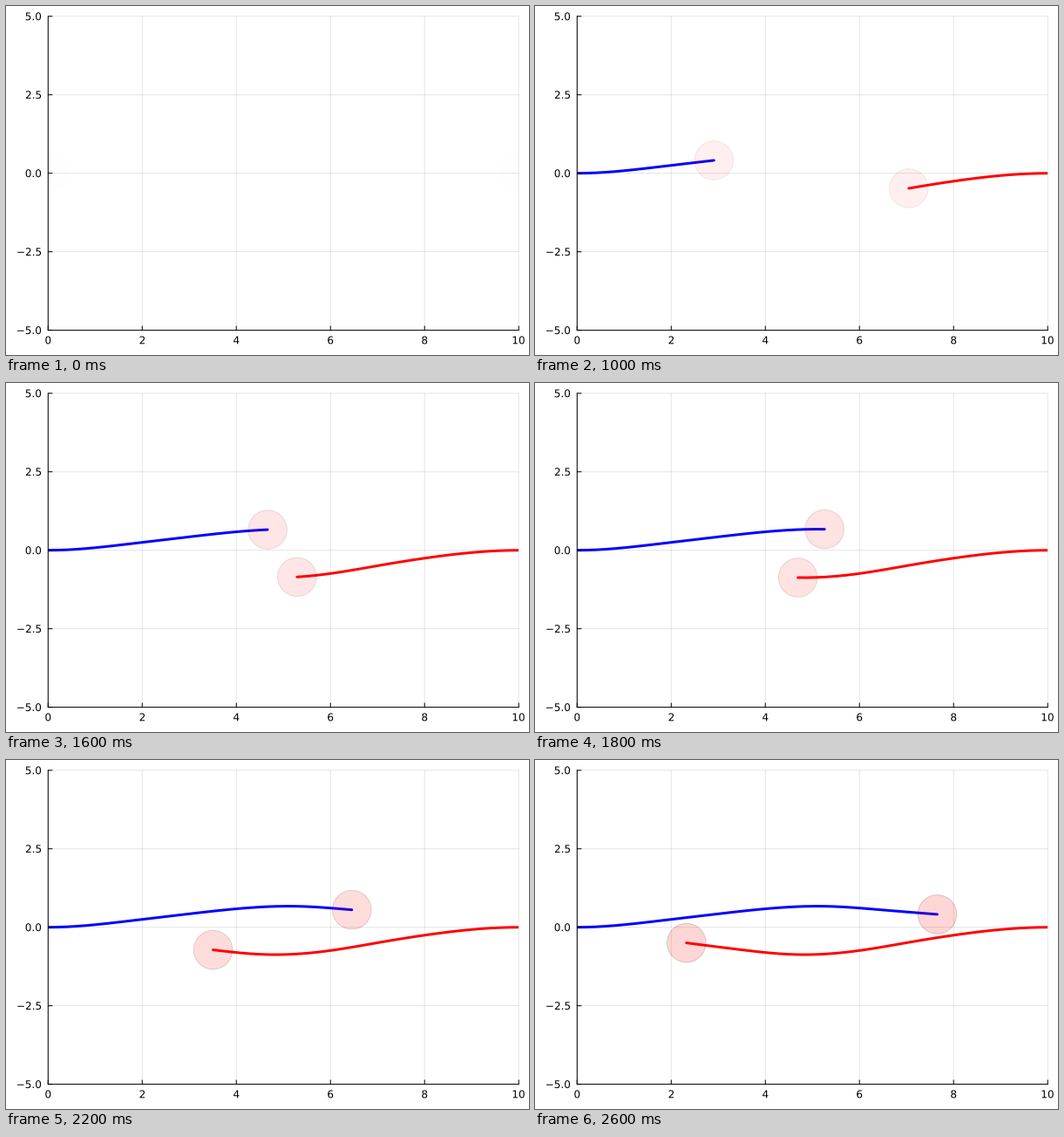
Write a matplotlib script that moves like this. It is 600 px wide and 400 px high and loops after 2.67 s.

```python
import numpy as np
import matplotlib.pyplot as plt
from matplotlib.animation import FuncAnimation
from matplotlib.patches import Circle, PathPatch, Rectangle
from matplotlib.textpath import TextPath
from matplotlib.transforms import Affine2D

DPI = 100
PX = 72 / DPI                  # one pixel in points
LEFT, RIGHT, TOP, BOTTOM = 48.3, 588.19, 11.81, 371.61
MID = (TOP + BOTTOM) / 2
TICK_LEN, TEXT_SIZE = 4.72, 12
STEPS = 40
TICK_MS, TICKS = 10, 267       # 267 * 10 ms = one loop at 15 steps per second

KNOTS = np.array([0, 9, 15, 21, 27, 33, 39])


def spline(values, start_slope):
    """Cubic spline through the knots, free at its end, sampled at each step."""
    v = np.array(values, float)
    n = len(v)
    h, d = np.diff(KNOTS), np.diff(v) / np.diff(KNOTS)
    a, b = np.zeros((n, n)), np.zeros(n)
    a[0, 0], b[0] = 1, start_slope
    for i in range(1, n - 1):
        a[i, i - 1:i + 2] = h[i], 2 * (h[i - 1] + h[i]), h[i - 1]
        b[i] = 3 * (h[i] * d[i - 1] + h[i - 1] * d[i])
    a[-1, -2:], b[-1] = (1, 2), 3 * d[-1]
    m = np.linalg.solve(a, b)

    k = np.arange(STEPS)
    i = np.clip(np.searchsorted(KNOTS, k, side="right") - 1, 0, n - 2)
    t = (k - KNOTS[i]) / h[i]
    return ((1 + 2 * t) * (1 - t) ** 2 * v[i] + t * (1 - t) ** 2 * h[i] * m[i]
            + t * t * (3 - 2 * t) * v[i + 1] + t * t * (t - 1) * h[i] * m[i + 1])


# Travelled distance and sideways drift of each body, in pixels
blue_x = LEFT + spline([0, 94.9, 157, 220, 283.9, 348.5, 413.2], 10.6)
blue_y = MID - spline([0, 7.5, 14.8, 21.5, 24.1, 20, 14.8], 0)
red_x = RIGHT - spline([0, 96.5, 159.4, 222.2, 286.6, 350.7, 414.4], 10.8)
red_y = MID + spline([0, 7.5, 17.3, 27.5, 31.3, 25.9, 17.9], 0)

fig = plt.figure(figsize=(6, 4), dpi=DPI, facecolor="white")
ax = fig.add_axes([0, 0, 1, 1])
ax.set_xlim(0, 600)
ax.set_ylim(400, 0)
ax.axis("off")


def rule(xs, ys, z=5, alpha=1):
    ax.plot(xs, ys, color="black", alpha=alpha, lw=PX, snap=False, zorder=z,
            solid_capstyle="round")


def label(x, baseline, text, anchor):
    """Draw text as outlines; anchor 0.5 centres it on x, 1 ends it there."""
    glyphs = TextPath((0, 0), text, size=TEXT_SIZE,
                      prop={"family": "DejaVu Sans"})
    box = glyphs.get_extents()
    shift = x - box.x0 - anchor * box.width
    place = Affine2D().scale(1, -1).translate(shift, baseline)
    ax.add_patch(PathPatch(glyphs.transformed(place), fc="black", lw=0,
                           snap=False))


for value in range(0, 11, 2):
    x = LEFT + (RIGHT - LEFT) * value / 10
    rule([x, x], [TOP, BOTTOM], 1, 0.1)
    rule([x, x], [BOTTOM, BOTTOM - TICK_LEN])
    label(x, 387.3, str(value), 0.5)

for value in np.arange(-5, 5.1, 2.5):
    y = MID - (BOTTOM - TOP) * value / 10
    rule([LEFT, RIGHT], [y, y], 1, 0.1)
    rule([LEFT, LEFT + TICK_LEN], [y, y])
    label(40.1, y + 4.4, f"{value:.1f}".replace("-", "\u2212"), 1)

rule([LEFT, LEFT], [TOP, BOTTOM])
rule([LEFT, RIGHT], [BOTTOM, BOTTOM])

plot_area = Rectangle((LEFT, TOP), RIGHT - LEFT, BOTTOM - TOP,
                      transform=ax.transData)


def body(xs, ys, color):
    trail, = ax.plot([], [], color=color, lw=3 * PX, zorder=3, snap=False,
                     solid_capstyle="round", solid_joinstyle="round")
    disc = Circle((xs[0], ys[0]), 22.3, fc="red", ec="black", lw=PX, zorder=4)
    ax.add_patch(disc)
    for artist in (trail, disc):
        artist.set_clip_path(plot_area)
    return xs, ys, trail, disc


bodies = [body(blue_x, blue_y, "blue"), body(red_x, red_y, "red")]


def update(tick):
    step = min(int((tick + 0.5) * 3 / 20), STEPS - 1)
    shown = []
    for xs, ys, trail, disc in bodies:
        end = step + 1 if step else 0
        trail.set_data(xs[:end], ys[:end])
        disc.center = xs[step], ys[step]
        disc.set_alpha(0.004 * (step + 1))
        shown += [trail, disc]
    return shown


anim = FuncAnimation(fig, update, frames=TICKS, interval=TICK_MS,
                     init_func=lambda: update(0), repeat=True,
                     repeat_delay=0, cache_frame_data=False)
plt.show()
```
